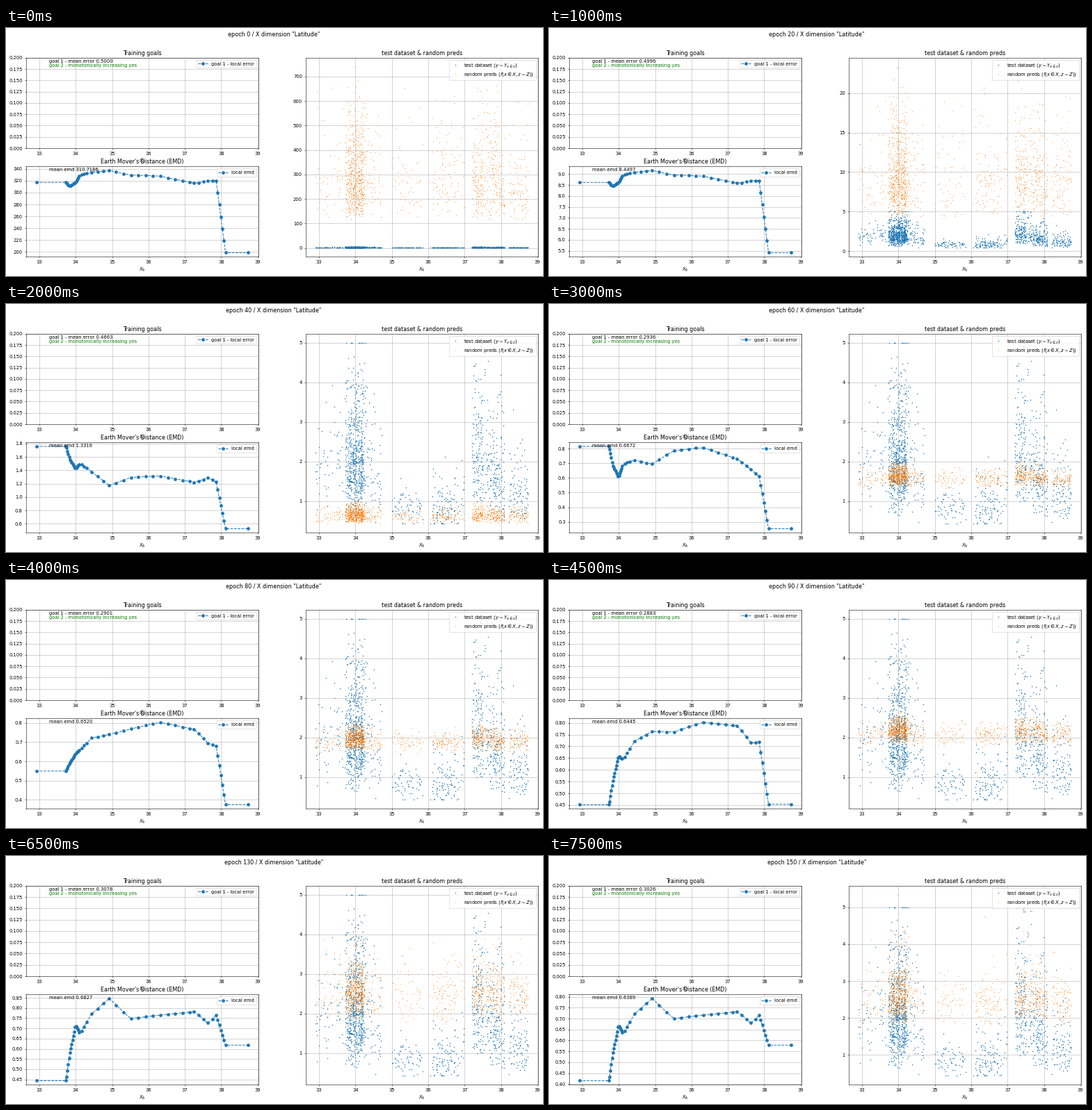
Recreate the animation shown at these times as a matplotlib script. Size 772 by 357 pixels, loop 8 s.

```python
import numpy as np
import matplotlib.pyplot as plt
from matplotlib.animation import FuncAnimation

W, H = 772, 357
FRAMES, STEP = 16, 10
BLUE, ORANGE = "tab:blue", "tab:orange"

# Readouts at key epochs, interpolated between
EPOCHS = [0, 20, 40, 60, 90, 130, 150]
MEAN_EMD = [310.7186, 8.4497, 1.3316, .6672, .6445, .6827, .6389]
MEAN_ERR = [.5, .4996, .4663, .2936, .2883, .3078, .3026]

# Profile of the local EMD relative to its mean, at a few latitudes
KNOTS = [33.73, 33.83, 33.99, 34.12, 34.44, 34.92,
         35.5, 36.3, 37.28, 37.65, 37.86, 38.12]
EARLY = [1.02, 1, 1.02, 1.06, 1.075, 1.085, 1.06, 1.055, 1.015, 1.03, 1.03, .64]
FALL = [1.32, 1.18, 1.07, 1.13, 1.035, .88, .97, .99, .915, .97, .92, .395]
TURN = [1.22, 1.03, .91, 1.04, 1.08, 1.04, 1.175, 1.21, 1.09, .98, .915, .38]
RISE = [.7, .85, 1.02, 1, 1.12, 1.185, 1.18, 1.245, 1.22, 1.105, 1.115, .703]
LATE = [.65, .84, 1.045, .99, 1.13, 1.24, 1.095, 1.12, 1.145, 1.06, 1.12, .905]
PROFILES = [EARLY, EARLY, FALL, TURN, RISE, LATE, LATE]

# Median and log-spread of the predictions
PRED_EPOCHS = [0, 20, 40, 50, 60, 90, 130, 150]
MEDIAN = [280, 9.6, .67, .8, 1.66, 2.2, 2.6, 2.6]
SPREAD = [.405, .37, .18, .28, .085, .075, .15, .16]

# Populated latitude bands: from, to, number of samples
BANDS = [(32.9, 33.65, 55), (33.7, 34.28, 320), (33.8, 34.2, 280),
         (34.3, 34.72, 55), (35, 35.85, 62), (36.05, 37, 110),
         (37.2, 37.5, 145), (37.5, 38.1, 180), (38.2, 38.75, 90)]

rng = np.random.default_rng(6)
x_test = np.concatenate([rng.uniform(*band) for band in BANDS]).round(2)
x_test[0], x_test[-1] = 32.92, 38.74
mid_value = np.interp(x_test, [34.2, 35.2, 36.8, 37.3, 38.1, 38.7],
                      [2, .85, .8, 2.5, 1.4, 1.2])
y_test = mid_value * np.exp(.4 * rng.standard_normal(x_test.size))
y_test = np.clip(y_test, .43, 5)
peak = np.argmin(abs(x_test - 33.97))


def bump(x, center, width):
    return np.exp(-((x - center) / width) ** 2)


# Predictions sit a little higher in the two dense areas
level = .94 + .06 * (bump(x_test, 34, .35) + bump(x_test, 37.5, .4))

SPANS = [(33.72, 34.1, 17), (34.16, 34.3, 3), (34.44, 34.92, 4),
         (35.11, 36.94, 10), (37.13, 37.76, 6), (37.86, 38.12, 7)]
x_emd = np.concatenate([[32.92], *(np.linspace(*s) for s in SPANS), [38.74]])


def log_interp(epoch, keys, values):
    return np.exp(np.interp(epoch, keys, np.log(values)))


def local_emd(epoch):
    profile = [log_interp(epoch, EPOCHS, column) for column in zip(*PROFILES)]
    return log_interp(epoch, EPOCHS, MEAN_EMD) * np.interp(x_emd, KNOTS, profile)


def predictions(epoch):
    noise = np.random.default_rng(100 + epoch)
    z = noise.triangular(-2.2, -.1, 2.4, x_test.size)
    z[peak] = 2.4
    mid = log_interp(epoch, PRED_EPOCHS, MEDIAN)
    spread = np.interp(epoch, PRED_EPOCHS, SPREAD)
    tail = np.interp(epoch, [120, 150], [0, .42])
    return mid * level * np.exp(spread * z + tail * np.maximum(z - 1.6, 0))


fig = plt.figure(figsize=(16, 7.4), dpi=48.25)


def panel(left, top, right, bottom, title):
    ax = fig.add_axes([left / W, 1 - bottom / H,
                       (right - left) / W, (bottom - top) / H])
    ax.set_title(title)
    ax.set_xlabel("$X_6$")
    ax.set_xlim(32.627, 39.027)
    ax.grid(True)
    return ax


def note(ax, y, text="", color="black"):
    return ax.text(.1, y, text, color=color, transform=ax.transAxes)


goals = panel(28.5, 42.8, 363, 173.1, "Training goals")
dist = panel(28.5, 199.1, 363, 329.4, "Earth Mover's Distance (EMD)")
data = panel(430.6, 42.8, 765.3, 329.4, "test dataset & random preds")

err_line, = goals.plot(x_emd, np.full(x_emd.size, .5), "o--", color=BLUE,
                       label="goal 1 - local error")
goals.set_ylim(0, .2)
emd_line, = dist.plot(x_emd, local_emd(0), "o--", color=BLUE, label="local emd")
data.plot(x_test, y_test, "o", ms=1.15, color=BLUE,
          label=r"test dataset ($y \sim Y_{x \in x}$)")
pred_dots, = data.plot(x_test, predictions(0), "o", ms=.55, color=ORANGE,
                       label=r"random preds ($f(x \in X, z \sim Z)$)")
for ax in (goals, dist, data):
    ax.legend(loc="upper right")

head = fig.suptitle("", x=.4985, y=.987, fontsize=12)
err_note = note(goals, .946)
note(goals, .896, "goal 2 - monotonically increasing yes", "green")
emd_note = note(dist, .946)


def update(i):
    epoch = i * STEP
    head.set_text(f'epoch {epoch} / X dimension "Latitude"')
    err = np.interp(epoch, EPOCHS, MEAN_ERR)
    err_line.set_ydata(np.full(x_emd.size, err))
    err_note.set_text(f"goal 1 - mean error {err:.4f}")
    emd_line.set_ydata(local_emd(epoch))
    emd_note.set_text(f"mean emd {log_interp(epoch, EPOCHS, MEAN_EMD):.4f}")
    pred_dots.set_ydata(predictions(epoch))
    for ax in (dist, data):
        ax.relim()
        ax.autoscale_view(scalex=False)
    return head, err_line, err_note, emd_line, emd_note, pred_dots


anim = FuncAnimation(fig, update, frames=FRAMES, interval=500,
                     init_func=lambda: update(0), repeat=True, blit=False)
plt.show()
```
